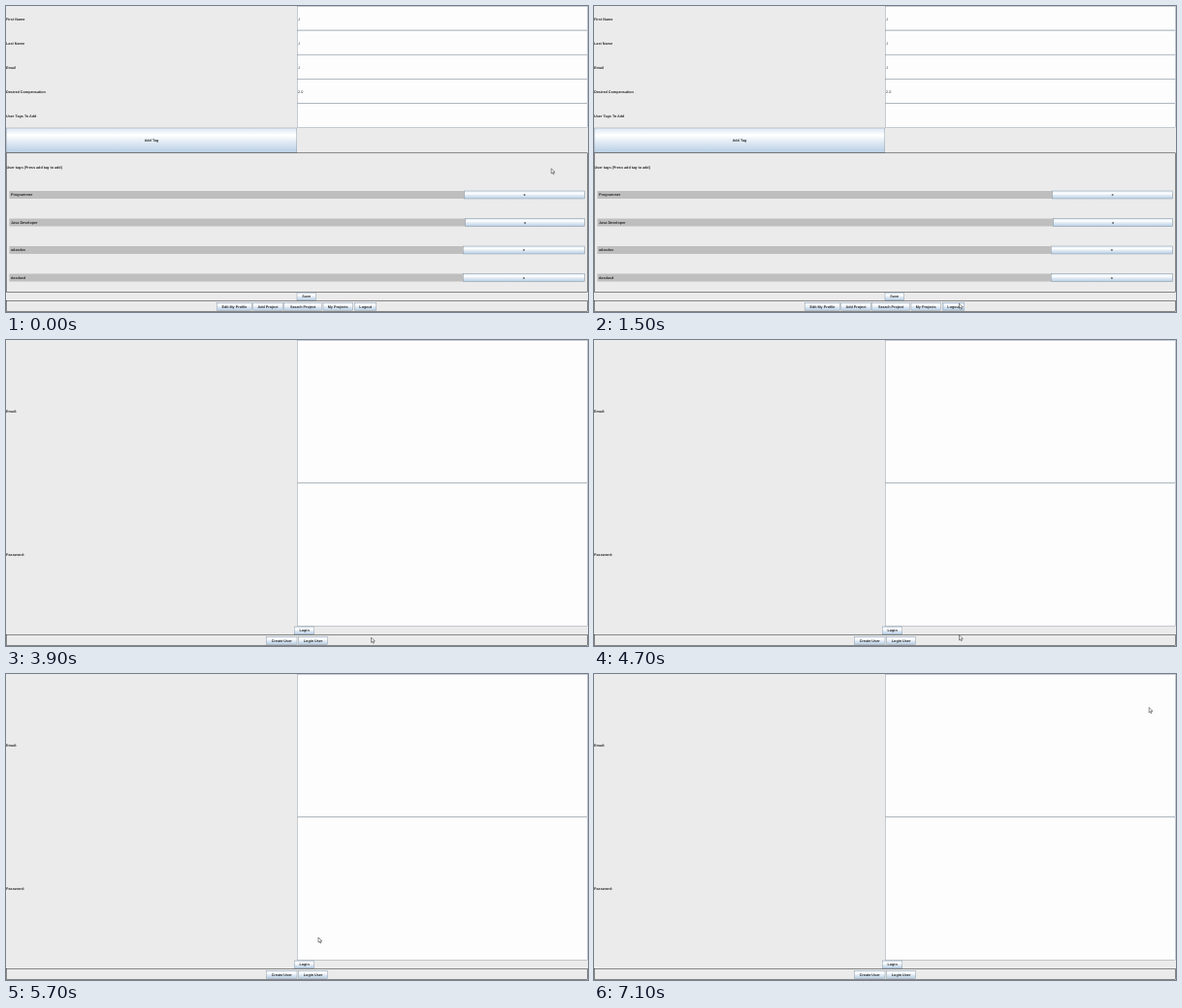
Recreate the animation shown at these times as an HTML page. Size 600 by 316 pixels, loop 7.9 s.

```html
<!DOCTYPE html>
<html lang="en">
<head>
<meta charset="utf-8">
<title>Profile form and login</title>
<style>
  html, body { margin: 0; width: 100%; height: 100%; overflow: hidden; background: #ebebeb; }
  svg { display: block; width: 100vw; height: 100vh; }
  text {
    font: bold 3.75px "Liberation Sans", Arial, sans-serif;
    text-rendering: geometricPrecision;
    fill: #2b2b2b;
  }
  .plain { font-weight: normal; }
  .mid { text-anchor: middle; }
  .field { fill: #fdfdfd; stroke: #7a8a99; stroke-width: .4; }
  .button { fill: url(#ocean); stroke: #7a8a99; stroke-width: .4; }
  .line { fill: none; stroke: #222; stroke-width: .5; }
  .bar { fill: #bebebe; }
  .glow { fill: none; stroke: #a9c3de; stroke-width: .6; }
  .pressed { fill: #b4c9de; stroke: #7a8a99; stroke-width: .4; }
</style>
</head>
<body>
<svg viewBox="0 0 600 316" preserveAspectRatio="none">
  <defs>
    <linearGradient id="ocean" x2="0" y2="1">
      <stop offset="0" stop-color="#dde8f3"/>
      <stop offset=".3" stop-color="#fff"/>
      <stop offset=".6" stop-color="#dde8f3"/>
      <stop offset="1" stop-color="#b8cfe5"/>
    </linearGradient>
  </defs>
  <rect width="600" height="316" fill="#ebebeb"/>
  <g id="profile"></g>
  <g id="login"></g>
  <path id="cursor" d="M0 0V5.2L1.2 4.1L2 6L2.9 5.6L2.1 3.8H3.8Z"
        fill="#fff" stroke="#222" stroke-width=".5"/>
</svg>
<script>
const byId = id => document.getElementById(id);
const profile = byId('profile'), login = byId('login'), cursor = byId('cursor');

function add(parent, tag, attrs, content = '') {
  const node = document.createElementNS('http://www.w3.org/2000/svg', tag);
  for (const key in attrs) node.setAttribute(key, attrs[key]);
  node.textContent = content;
  return parent.appendChild(node);
}
const box = (page, cls, x, y, width, height) =>
  add(page, 'rect', { class: cls, x, y, width, height });
// y is the vertical centre of the capitals
const label = (page, content, x, y, cls = '') =>
  add(page, 'text', { class: cls, x, y: y + 1.35 }, content);

function button(page, content, left, right, top, height = 8) {
  const rect = box(page, 'button', left, top, right - left, height);
  label(page, content, (left + right) / 2, top + height / 2, 'mid');
  return rect;
}
function navigation(page, items) {
  box(page, 'line', .3, 304.4, 599.4, 11.2);
  return items.map(([content, left, right]) => button(page, content, left, right, 306.2));
}

// Profile page
const rowHeight = 25.15;
[['First Name', 'J'], ['Last Name', 'J'], ['Email', 'J'],
 ['Desired Compensation', '2.0'], ['User Tags To Add', '']].forEach(([name, value], i) => {
  const top = i * rowHeight, middle = 13.2 + i * 25;
  label(profile, name, 0, middle);
  box(profile, 'field', 300.2, top + .2, 299.4, rowHeight - .4);
  label(profile, value, 301, middle, 'plain');
});
button(profile, 'Add Tag', .2, 299.8, 126, 25.3);
box(profile, 'line', .4, 151.8, 599.2, 143.6);
label(profile, 'User tags (Press add tag to add)', .4, 166.4);
[['Programmer', 472.6], ['Java Developer', 473.6], ['adasdas', 471.2], ['dasdasd', 471.2]]
  .forEach(([tag, left], i) => {
    const top = 191 + i * 28.5;
    box(profile, 'bar', 3.4, top, 593.2, 8);
    label(profile, tag, 5, top + 4);
    button(profile, 'x', left, 596.4, top);
  });
button(profile, 'Save', 300, 319.4, 296);
const logout = navigation(profile, [
  ['Edit My Profile', 217.6, 253.2], ['Add Project', 254.8, 285.2],
  ['Search Project', 286.8, 325.4], ['My Projects', 327, 357.4], ['Logout', 359.6, 381.8]
]).pop();
const glow = box(profile, 'glow', 360.2, 306.8, 21, 6.8);

// Login page
[['Email:', 74], ['Password:', 222]].forEach(([name, middle], i) => {
  label(login, name, 0, middle);
  box(login, 'field', 300.2, .2 + i * 147.7, 299.4, 147.3);
});
button(login, 'Login', 297.4, 317.8, 296);
navigation(login, [['Create User', 268.4, 300], ['Login User', 301.8, 331.4]]);

// Pointer positions: start time in ms, x, y
const path = [
  [0, 562.2, 167.8],
  [700, 572, 172], [800, 590.5, 190], [900, 580, 232],
  [1000, 522, 276], [1100, 430, 302], [1200, 378.5, 307],
  [1500, 376.5, 307.2],
  [4700, 376.5, 304.8],
  [5100, 322.8, 301.6], [5200, 317, 300.6],
  [5600, 318, 295], [5700, 322, 272], [5800, 327, 240], [5900, 326.5, 215], [6000, 324.8, 204.8],
  [6300, 501, 49],
  [6600, 583, 30],
  [6800, 581, 30], [6900, 578, 31.5], [7000, 574.5, 33.5], [7100, 572.2, 34.6]
];
const DURATION = 7900, HOVER = 1200, PRESS = 3800, LOGIN = 3900;
const show = (node, visible) => node.style.display = visible ? '' : 'none';
const start = performance.now();

function draw(now) {
  const time = Math.max(0, now - start) % DURATION;
  const [, x, y] = path.findLast(step => step[0] <= time);
  cursor.setAttribute('transform', `translate(${x} ${y})`);
  show(profile, time < LOGIN);
  show(login, time >= LOGIN);
  show(glow, time >= HOVER && time < PRESS);
  logout.setAttribute('class', time >= PRESS ? 'pressed' : 'button');
  requestAnimationFrame(draw);
}
draw(start);
</script>
</body>
</html>
```
